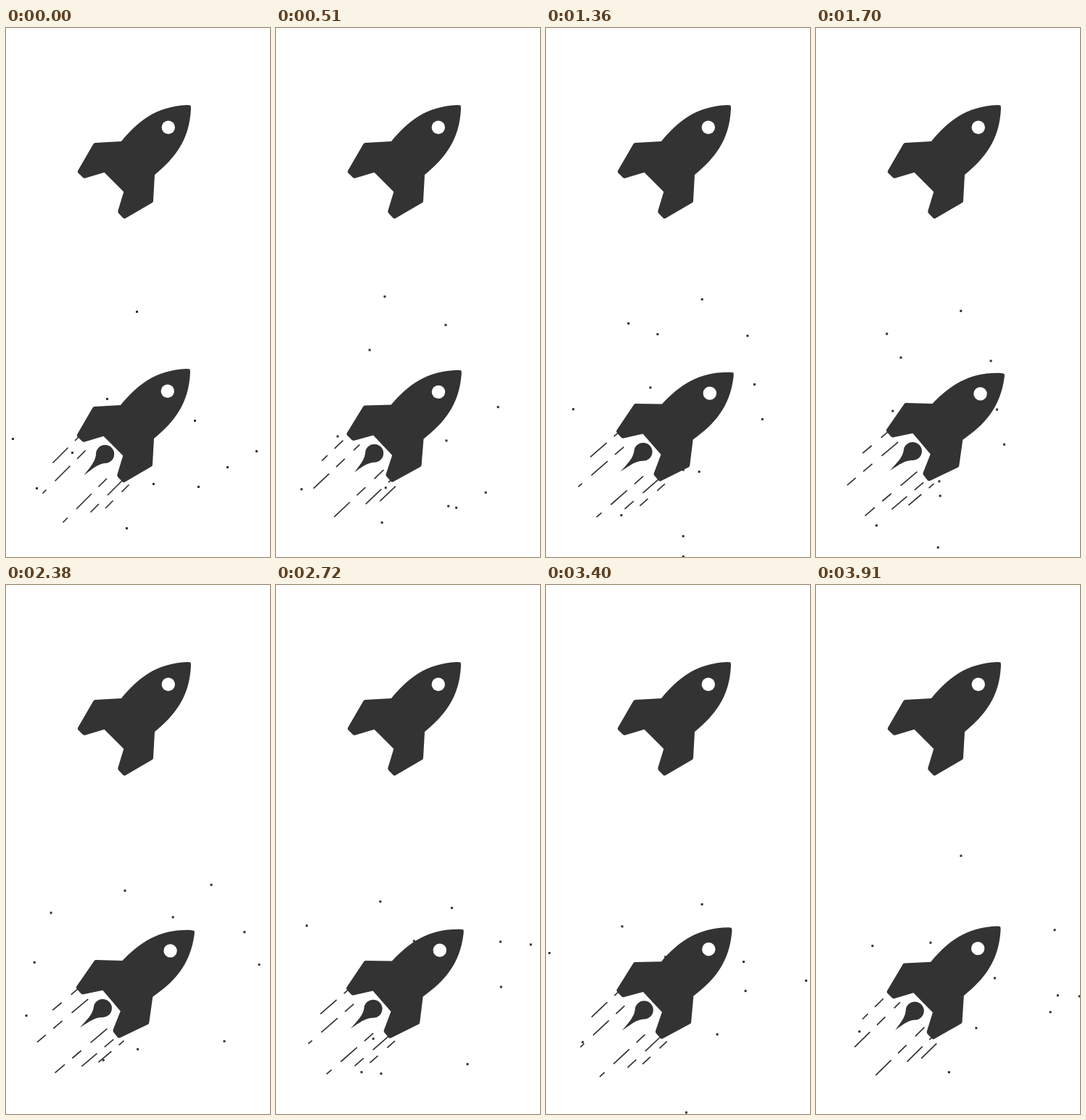
These frames come from a looping animation (364x728 px, 4080 ms). An HTML page with a canvas:

```html
<!DOCTYPE html>
<html lang="en">
<head>
<meta charset="utf-8">
<title>Rocket</title>
<style>
  html, body { margin: 0; width: 100%; height: 100%; overflow: hidden; background: #fff; }
  canvas { display: block; }
</style>
</head>
<body>
<canvas id="stage" width="364" height="728"></canvas>
<script>
const STEP = 170, STEPS = 24;
const INK = '#333';
const CX = 182, CY = 546, RADIUS = 182;
const TILT = 5.8 * Math.PI / 180;
const AXIS = 361; // the rocket is symmetric about x + y = AXIS
const ctx = document.getElementById('stage').getContext('2d');

// One side of the hull, reaching slightly past the axis
const hullSide = new Path2D(
  'M159 156C182 128 207 108 250 106Q253.5 106 254.4 106.6L215 160L160 217L148.9 212.1' +
  'L135.5 198.7L109.5 206.6Q107.5 207.2 105.7 205.5L99.5 199.5Q98 198 99.3 196' +
  'L120.5 159.5Q121.5 158 123 158Z');

// Flight coordinates: offset across the path, distance along it
const place = (across, along) => [CX + (across - along) / 2, CY + (across + along) / 2];
const mod = (a, b) => ((a % b) + b) % b;

function randomizer(seed) {
  return () => (seed = (seed * 16807) % 2147483647) / 2147483647;
}

function starLayer(count, speed, span, seed) {
  const random = randomizer(seed);
  const stars = Array.from({ length: count }, (_, i) => ({
    across: (random() - 0.5) * 460,
    start: (i + random()) * span / count
  }));
  return { stars, speed, span };
}

const layers = [
  starLayer(5, 16.7, 520, 4711),
  starLayer(15, 36, 864, 90210)
];

function drawStars({ stars, speed, span }, n) {
  for (const { across, start } of stars) {
    const [x, y] = place(across, mod(start + speed * n, span) - 260);
    if (Math.hypot(x - CX, y - CY) > RADIUS) continue;
    ctx.fillRect(Math.round(x) - 1, Math.round(y) - 1, 3, 3);
  }
}

// Each lane repeats a long and a short dash
const lanes = [
  { across: -65, phase: 20 }, { across: -37, phase: 42 },
  { across: 31, phase: 51 }, { across: 55, phase: 97 }, { across: 70, phase: 73 }
];
const PERIOD = 108, LONG = 42, SHORT = 23, GAP = 24;

function dash(across, from, to) {
  from = Math.max(from, 95);
  to = Math.min(to, 300 - 2 * Math.abs(across));
  if (to - from < 4) return;
  ctx.moveTo(...place(across, from));
  ctx.lineTo(...place(across, to));
}

function drawStreaks(n) {
  ctx.beginPath();
  for (const { across, phase } of lanes) {
    let s = mod(phase + n * PERIOD * 0.75, PERIOD) - PERIOD;
    for (; s < 250; s += PERIOD) {
      dash(across, s, s + LONG);
      dash(across, s + LONG + GAP, s + LONG + GAP + SHORT);
    }
  }
  ctx.stroke();
}

function fillBothSides(path) {
  ctx.fill(path);
  ctx.save();
  ctx.transform(0, -1, -1, 0, AXIS, AXIS);
  ctx.fill(path);
  ctx.restore();
}

function disc(x, y, r) {
  ctx.beginPath();
  ctx.arc(x, y, r, 0, Math.PI * 2);
  ctx.fill();
}

function drawFlame(pull) {
  disc(137.6, 223.4, 12.6);
  fillBothSides(new Path2D(
    `M125 224.5C123.5 234 118 240 ${108.5 + pull} ${252.5 - pull}L138.5 224.5Z`));
}

function drawRocket() {
  fillBothSides(hullSide);
  ctx.fillStyle = '#fff';
  disc(223.8, 136.8, 9.2);
  ctx.fillStyle = INK;
}

function draw(n) {
  ctx.fillStyle = '#fff';
  ctx.fillRect(0, 0, 364, 728);
  ctx.fillStyle = ctx.strokeStyle = INK;
  ctx.lineWidth = 1.7;
  drawRocket();

  ctx.save();
  ctx.translate(CX, CY);
  ctx.rotate(TILT * (1 - Math.abs(1 - n / (STEPS / 2))));
  ctx.translate(-CX, -CY);
  layers.forEach(layer => drawStars(layer, n));
  drawStreaks(n);
  ctx.translate(-1, 363);
  drawFlame(n % 2 * 2.5);
  drawRocket();
  ctx.restore();
}

const began = performance.now();
function tick() {
  draw(Math.floor((performance.now() - began) / STEP) % STEPS);
  requestAnimationFrame(tick);
}
tick();
</script>
</body>
</html>
```
